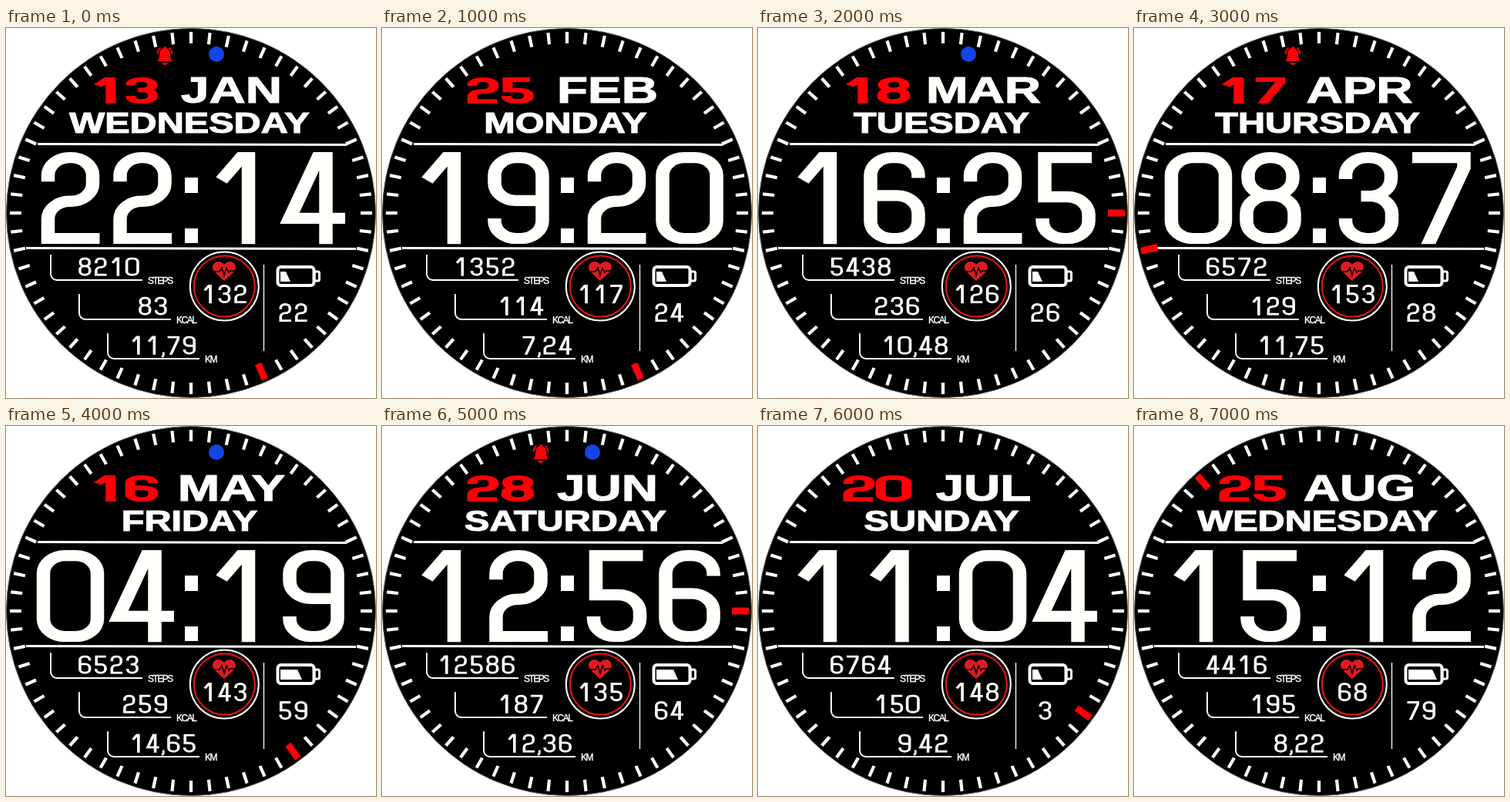
An HTML page with a canvas for the animation above (8000 ms loop, 480 by 480 pixels).

```html
<!DOCTYPE html>
<html lang="en">
<meta charset="utf-8">
<title>Watch face</title>
<style>
  html, body { margin: 0; height: 100%; overflow: hidden; background: #fff; }
  canvas { display: block; width: 100vw; height: 100vh; }
</style>
<canvas width="480" height="480"></canvas>
<script>
const ctx = document.querySelector('canvas').getContext('2d');
const WHITE = '#fffffc', RED = '#ff0008', HEART = '#dc1c20', BLUE = '#1446e6';

// One watch state per second.
const states = [
  { day: '13', month: 'JAN', name: 'WEDNESDAY', time: '2214', sec: 26, steps: '8210', kcal: '83', km: '11,79', pulse: '132', power: 22, alarm: 1, link: 1 },
  { day: '25', month: 'FEB', name: 'MONDAY', time: '1920', sec: 26, steps: '1352', kcal: '114', km: '7,24', pulse: '117', power: 24 },
  { day: '18', month: 'MAR', name: 'TUESDAY', time: '1625', sec: 15, steps: '5438', kcal: '236', km: '10,48', pulse: '126', power: 26, link: 1 },
  { day: '17', month: 'APR', name: 'THURSDAY', time: '0837', sec: 43, steps: '6572', kcal: '129', km: '11,75', pulse: '153', power: 28, alarm: 1 },
  { day: '16', month: 'MAY', name: 'FRIDAY', time: '0419', sec: 24, steps: '6523', kcal: '259', km: '14,65', pulse: '143', power: 59, link: 1 },
  { day: '28', month: 'JUN', name: 'SATURDAY', time: '1256', sec: 15, steps: '12586', kcal: '187', km: '12,36', pulse: '135', power: 64, alarm: 1, link: 1 },
  { day: '20', month: 'JUL', name: 'SUNDAY', time: '1104', sec: 21, steps: '6764', kcal: '150', km: '9,42', pulse: '148', power: 3 },
  { day: '25', month: 'AUG', name: 'WEDNESDAY', time: '1512', sec: 53, steps: '4416', kcal: '195', km: '8,22', pulse: '68', power: 79 }
];

// Numeral centre lines: "x,y" is a rounded corner, "x,y,0" a sharp one; "/" starts a new stroke.
const HEIGHT = 128;
const numerals = [
  '0,0 35,0 35,128 -35,128 -35,0 0,0',
  '-25,36 9,-12 / 10,-16 10,144',
  '-29,38 -29,0 29,0 29,69 -29,69 -29,128,0 38,128',
  '-30,34 -30,0 29,0 29,61 -10,61 / -10,61 30,61 30,128 -30,128 -30,96',
  '41,96 -31,96,0 11,-14 / 16,-16 16,144',
  '34,0 -27,0,0 -27,62,0 30,62 30,128 -30,128 -30,96',
  '-31,60 31,60 31,128 -31,128 -31,0 31,0 31,32',
  '-38,0 29,0,0 29,16,0 -20,144',
  '0,60 -29,60 -29,0 29,0 29,60 0,60 / 0,60 31,60 31,128 -31,128 -31,60 0,60',
  '31,68 -31,68 -31,0 31,0 31,128 -31,128 -31,96'
].map(glyph => glyph.split(' / ').map(s => s.split(' ').map(p => p.split(',').map(Number))));

const clockStyle = { sx: 1, sy: .82, weight: 17.5 };
const smallStyle = { sx: .205, sy: .166, weight: 17.5 };
const dateStyle = { sx: .48, sy: .22, weight: 27 };
const PITCH = 20.5, COMMA = 6.5;

// Draws a numeral centred on x with its outer top edge at y.
function numeral(digit, x, y, { sx, sy, weight }) {
  ctx.save();
  ctx.translate(x, y);
  ctx.scale(sx, sy);
  ctx.translate(0, weight / 2);
  ctx.beginPath();
  ctx.rect(-60, -weight / 2, 120, HEIGHT + weight);
  ctx.clip();
  ctx.lineWidth = weight;
  ctx.beginPath();
  for (const points of numerals[digit]) {
    points.forEach(([px, py, radius = 28], i) => {
      const next = points[i + 1];
      if (!i) ctx.moveTo(px, py);
      else if (next) ctx.arcTo(px, py, next[0], next[1], radius);
      else ctx.lineTo(px, py);
    });
  }
  ctx.stroke();
  ctx.restore();
}

// Small number whose last digit is centred on x.
function number(text, x, y) {
  for (const char of [...text].reverse()) {
    if (char === ',') {
      const cx = x + PITCH / 2 - COMMA / 2;
      line(2.8, [cx + .5, y + 21], [cx + .5, y + 25], [cx - 1.5, y + 27.5]);
      x -= COMMA;
    } else {
      numeral(char, x, y, smallStyle);
      x -= PITCH;
    }
  }
}
const centred = (text, x, y) => number(text, x + (text.length - 1) * PITCH / 2, y);

function line(width, ...points) {
  ctx.lineWidth = width;
  ctx.beginPath();
  points.forEach(p => ctx.lineTo(...p));
  ctx.stroke();
}

function circle(x, y, r) {
  ctx.beginPath();
  ctx.arc(x, y, r, 0, 2 * Math.PI);
}

function ink(color) {
  ctx.fillStyle = ctx.strokeStyle = color;
}

// Extended bold lettering.
function word(text, x, y, size) {
  ctx.save();
  ctx.translate(x, y);
  ctx.scale(1.35, 1);
  ctx.font = `bold ${size}px "Liberation Sans", Arial, sans-serif`;
  ctx.textAlign = 'center';
  ctx.lineWidth = 1.1;
  ctx.fillText(text, 0, 0);
  ctx.strokeText(text, 0, 0);
  ctx.restore();
}

function tick(second, inner, outer, width) {
  const a = second * Math.PI / 30, x = Math.sin(a), y = -Math.cos(a);
  line(width, [240 + inner * x, 240 + inner * y], [240 + outer * x, 240 + outer * y]);
}

function reading(label, value, i) {
  const x = 58 + 37 * i, y = 294 + 51 * i;
  ctx.lineWidth = 2;
  ctx.stroke(new Path2D(`M${x} ${y}v25a8 8 0 0 0 8 8h111`));
  ctx.font = '12px "Liberation Sans", Arial, sans-serif';
  ctx.letterSpacing = '-1.5px';
  ctx.lineWidth = .4;
  ctx.fillText(label, x + 126, y + 38);
  ctx.strokeText(label, x + 126, y + 38);
  ctx.letterSpacing = '0px';
  number(value, x + 105.8, y + 3.5);
}

function bell() {
  ink(RED);
  ctx.fill(new Path2D('M206 24q2 0 2 2q5 2 5 9q0 5 3 8h-20q3-3 3-8q0-7 5-9q0-2 2-2M202 45h8q-1 3-4 3t-4-3'));
  ctx.lineWidth = 2;
  ctx.stroke(new Path2D('M196.5 34q0-5 4-8.5M215.5 34q0-5-4-8.5'));
}

function pulse(value) {
  ctx.lineWidth = 2;
  circle(283.3, 335, 44.5);
  ctx.stroke();
  centred(value, 283.5, 333);
  ink('#e8141a');
  circle(283.3, 335, 39.5);
  ctx.stroke();
  ink(HEART);
  ctx.fill(new Path2D('M283 328L271 317C264 309 271 303 275 303Q280 303 283 307Q286 303 291 303C295 303 302 309 295 317Z'));
  ink('#000');
  line(1.5, [267, 316], [277, 316], [280, 311], [283, 321], [286, 311], [289, 317], [291, 315], [299, 315]);
}

function battery(power) {
  ink(WHITE);
  ctx.lineWidth = 4;
  ctx.beginPath();
  ctx.roundRect(352.5, 310, 47, 24, 4);
  ctx.stroke();
  ctx.lineWidth = 3;
  ctx.beginPath();
  ctx.roundRect(400, 316, 6.5, 12, 2);
  ctx.stroke();
  const end = power < 34 ? 363 : power < 67 ? 378 : 387;
  ctx.fill(new Path2D(`M356 316H${end}L${end + 6} 329H356Z`));
  centred(String(power), 372.5, 357);
}

function draw(s) {
  ink('#fff');
  ctx.fillRect(0, 0, 480, 480);
  ink('#000');
  circle(240, 240, 239.5);
  ctx.fill();
  ink('#666');
  ctx.lineWidth = 1;
  ctx.stroke();

  ink(WHITE);
  for (let i = 0; i < 60; i++) tick(i, 220, 235, 4.2);
  line(3, [41, 150.5], [442, 151.5]);
  line(3, [26, 285.5], [454, 286.5]);
  line(1.3, [334.5, 307], [334.5, 419]);

  word(s.month, 292.5, 97, 48.5);
  word(s.name, 238, 136, 36);
  [83.5, 177, 304.5, 399].forEach((x, i) => numeral(s.time[i], x, 161, clockStyle));
  ctx.fillRect(232, 194, 17, 20);
  ctx.fillRect(232, 260, 17, 19);

  reading('STEPS', s.steps, 0);
  reading('KCAL', s.kcal, 1);
  reading('KM', s.km, 2);
  pulse(s.pulse);
  battery(s.power);

  ink(RED);
  numeral(s.day[0], 131, 64, dateStyle);
  numeral(s.day[1], 176, 64, dateStyle);
  tick(s.sec, 214, 236, 9);
  if (s.alarm) bell();
  if (s.link) {
    ink(BLUE);
    circle(273, 34, 10);
    ctx.fill();
  }
}

function frame() {
  draw(states[Math.floor(performance.now() / 1000) % states.length]);
  requestAnimationFrame(frame);
}
frame();
</script>
</html>
```
